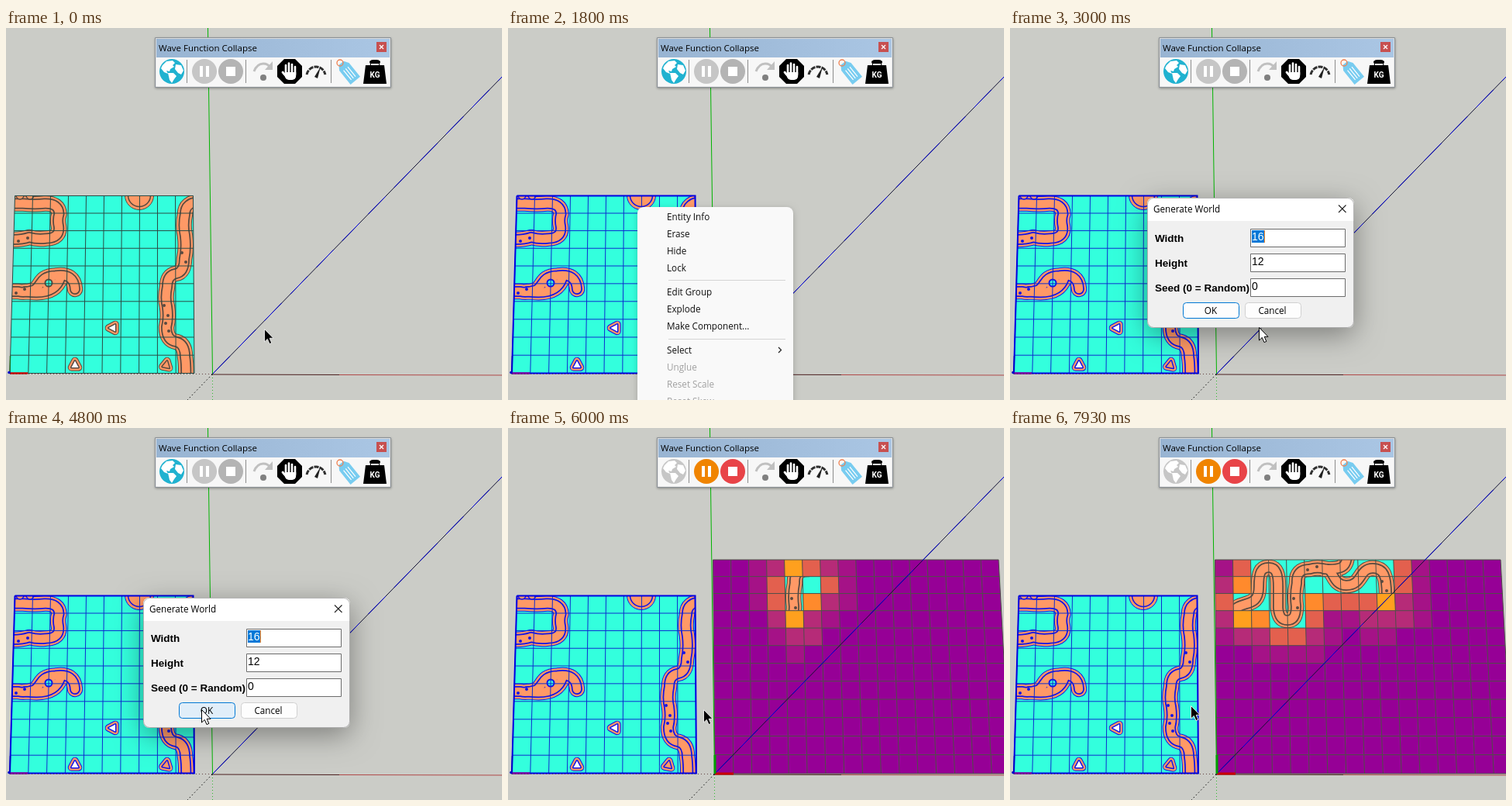
Animation, 640 px wide and 480 px high, one loop 8000 ms. Source, as an HTML page with a canvas:

```html
<!DOCTYPE html>
<html>
<head>
<meta charset="utf-8">
<style>
html, body { margin: 0; width: 640px; height: 480px; overflow: hidden; background: #cbccc7; }
canvas { display: block; }
</style>
</head>
<body>
<canvas id="stage" width="640" height="480"></canvas>
<script>
const ctx = document.getElementById('stage').getContext('2d');
const LOOP = 8000, SELECT = 1000, DIALOG = 2600, CLOSE = 5400, WORLD = 5530;
const CYAN = '#33ffdd', ORANGE = '#ff9966', DARK = '#594a40', BLUE = '#1414e6';
const HEAT = ['#960096', '#a51287', '#b62b78', '#e3604e', '#ff8a2c', '#ffa01e'];
const UI = '"Open Sans", "Noto Sans", sans-serif', ARIAL = '"Liberation Sans", Arial, sans-serif';

// Corners: top left, top right, bottom right, bottom left; k bends the row spacing.
const sample = { cols: 10, rows: 10, k: .02, q: [[11.5, 216.5], [241.5, 216.5], [243, 445.5], [5, 445.5]] };
const world = { cols: 16, rows: 12, k: .064, q: [[264.5, 170], [633, 170], [648, 446], [267, 446]] };

// Digits are heat levels, c is a finished tile.
const maps = [
  [],
  ['00125321', '0013cc31', '0013c421', '00025210', '0001220', '00001'],
  ['0013cccccc31', '0013cccccc31', '0123c4333521', '0125c2112221', '0122321011', '001111'],
  ['13cccccccc31', '24cccccccc31', '3cccc4333521', '254cc3112221', '1223321011', '001111']
];

const sampleRoads = [
  'M0 226.5H22Q38 228 50 226.5Q68 226 68.5 240Q66 247 68 256Q70 271 52 271.5Q40 273 30 270Q18 274 0 272.5',
  'M250 224Q231 225 231 240Q228 255 231 268Q233 284 230 298Q230 315 219 317Q208 319 208 334Q205 348 208 360Q210 374 207 386Q207 403 220 405Q231 408 231 424Q233 436 232 460',
  'M0 340H16Q24 342 32 339C47 337 40 320 64 319.5Q88 316 89 337',
  'M25 340Q62 346 70 323'
].map(d => new Path2D(d));
const worldRoads = [
  'M286 238C298 221 321 234 321 205C321 186 324 180 334 180C344 180 346 190 346 205V232C347 244 351 248 358 248C366 248 369 242 369 230Q367 215 370 200Q369 182 387 182Q396 179 408 182C418 182 416 203 434 203C455 203 450 181 468 181C482 181 486 190 486 216',
  'M405 182C428 183 434 180 435 165'
].map(d => new Path2D(d));
const sampleDots = [[28, 271], [16, 275], [24, 337], [13, 342], [227, 290], [232, 302], [204, 358], [209, 371], [206, 381], [210, 391]];
const worldDots = [[366, 220], [371, 232], [384, 183], [396, 179], [480, 198], [486, 210]];

const mouse = [[0, 333, 388], [70, 333, 388], [870, 167, 231], [1000, 167, 231], [1800, 230, 500], [2580, 300, 500],
  [3000, 321, 386], [3400, 332, 295], [3670, 332, 295], [4000, 316, 392], [4400, 252, 363], [6200, 252, 363],
  [7000, 242, 361], [7870, 233, 358], [LOOP, 233, 358]];

function at(g, u, v) {
  const [a, b, c, d] = g.q, x = u / g.cols, f = v / g.rows, y = f * (1 - g.k * (1 - f));
  return [0, 1].map(i => (a[i] * (1 - x) + b[i] * x) * (1 - y) + (d[i] * (1 - x) + c[i] * x) * y);
}

function line(points, color, width = 1, dash = []) {
  ctx.beginPath();
  points.forEach(p => ctx.lineTo(...p));
  ctx.strokeStyle = color;
  ctx.lineWidth = width;
  ctx.setLineDash(dash);
  ctx.stroke();
  ctx.setLineDash([]);
}

function poly(points, fill) {
  ctx.beginPath();
  points.forEach(p => ctx.lineTo(...p));
  ctx.closePath();
  ctx.fillStyle = fill;
  ctx.fill();
}

function disc(x, y, r, fill, stroke, width = 1) {
  ctx.beginPath();
  ctx.arc(x, y, r, 0, 7);
  if (fill) { ctx.fillStyle = fill; ctx.fill(); }
  if (stroke) { ctx.strokeStyle = stroke; ctx.lineWidth = width; ctx.stroke(); }
}

function rect(x, y, w, h, fill, stroke, r = 0) {
  ctx.beginPath();
  ctx.roundRect(x, y, w, h, r);
  if (fill) { ctx.fillStyle = fill; ctx.fill(); }
  if (stroke) { ctx.strokeStyle = stroke; ctx.lineWidth = 1; ctx.stroke(); }
}

function text(s, x, y, font, color = '#000', align = 'left') {
  ctx.font = font;
  ctx.fillStyle = color;
  ctx.textAlign = align;
  ctx.fillText(s, x, y);
}

function shadowed(blur, dy, alpha, draw) {
  ctx.save();
  ctx.shadowColor = `rgba(0,0,0,${alpha})`;
  ctx.shadowBlur = blur;
  ctx.shadowOffsetY = dy;
  draw();
  ctx.restore();
}

function roads(paths, ink, dots) {
  ctx.lineCap = ctx.lineJoin = 'round';
  for (const [width, color] of [[20.5, ink], [18.5, ORANGE], [14, ink], [10.5, ORANGE]]) {
    ctx.lineWidth = width;
    ctx.strokeStyle = color;
    paths.forEach(p => ctx.stroke(p));
  }
  ctx.lineCap = 'butt';
  dots.forEach(([x, y]) => disc(x, y, 2, ink));
}

function grid(g, color) {
  for (let u = 0; u <= g.cols; u++) line([at(g, u, 0), at(g, u, g.rows)], color);
  for (let v = 0; v <= g.rows; v++) line([at(g, 0, v), at(g, g.cols, v)], color);
}

function rock(x, y, turn, fill, ink) {
  const tri = new Path2D('M0 -4.5L4.5 4H-4.5Z');
  ctx.save();
  ctx.translate(x, y);
  ctx.rotate(turn);
  ctx.lineJoin = 'round';
  for (const [w, c] of [[9.5, ink], [7.5, ORANGE], [3, ink]]) {
    ctx.lineWidth = w;
    ctx.strokeStyle = c;
    ctx.stroke(tri);
  }
  ctx.fillStyle = fill;
  ctx.fill(tri);
  ctx.restore();
}

function drawSample(selected) {
  const ink = selected ? BLUE : DARK;
  poly(sample.q, CYAN);
  ctx.save();
  ctx.clip();
  roads(sampleRoads, ink, sampleDots);
  for (const x of [18, 31]) disc(x, 216, 5, ORANGE, ink, 1.5);
  disc(172, 216, 18.5, ORANGE, ink);
  disc(172, 216, 14.5, null, ink, 1.6);
  disc(55, 329, 9, ORANGE);
  disc(55, 329, 4.5, CYAN, ink, 2);
  rock(137, 387, -Math.PI / 2, '#fff', ink);
  rock(89, 434, 0, '#fff', ink);
  rock(207, 434, .2, ORANGE, ink);
  ctx.restore();
  grid(sample, selected ? '#0d2bd0' : '#2b4a44');
  if (selected) line([...sample.q, sample.q[0]], '#0000e0', 2);
  line([[5, 445], [5.5, 423]], selected ? '#0000c0' : '#207020', 1.5);
  line([[5, 445.5], [28, 445.5]], selected ? '#8000a0' : '#c80000', 2.5);
  disc(4, 444.5, 1.8, '#0000c8');
}

// Each stage spreads outward by column from where the collapse began.
function changeTime(stage, u, v) {
  const d = Math.abs(u - 4);
  if (stage == 1) return 5730 + 65 * Math.max(d, Math.abs(v - 1));
  if (stage == 2) return 6200 + 110 * d;
  return 7130 + 800 / 3 * Math.min(d, 3);
}

function cellState(u, v, t) {
  let state = '0';
  for (let s = 1; s < 4; s++) if (t >= changeTime(s, u, v)) state = (maps[s][v] || '')[u] || '0';
  return state;
}

function drawWorld(t) {
  const done = new Path2D();
  poly(world.q, HEAT[0]);
  for (let v = 0; v < 6; v++) for (let u = 0; u < 12; u++) {
    const state = cellState(u, v, t);
    if (state == '0') continue;
    const cell = [at(world, u, v), at(world, u + 1, v), at(world, u + 1, v + 1), at(world, u, v + 1)];
    poly(cell, state == 'c' ? CYAN : HEAT[state]);
    if (state == 'c') done.addPath(new Path2D('M' + cell.join('L') + 'Z'));
  }
  ctx.save();
  ctx.clip(done);
  roads(worldRoads, DARK, worldDots);
  ctx.restore();
  grid(world, '#505048');
}

function drawAxes(hasWorld) {
  line([[260.5, 0], [266.5, 446]], '#00b400');
  line([[266.5, 447], [266.5, 480]], '#30b830', 1, [1, 3]);
  line([[266, 447], [430, 447.5]], '#4c2020');
  line([[430, 447.5], [640, 448]], '#b04848');
  line([[5, 446.5], [266, 446.5]], '#604040', 1, [1, 3]);
  line([[266, 447], [234, 480]], '#000', 1, [1.5, 3]);
  line([[266.5, 446.5], [640.5, 62.5]], '#101030');
  line([[266.5, 446.5], [640.5, 62.5]], '#0000e0', 1, [32, 16]);
  if (hasWorld) {
    line([[267, 446], [291, 446]], '#c80000', 3);
    line([[267, 446], [267, 422]], '#00a000', 3);
  }
}

function drawToolbar(running) {
  const gray = '#c6c6c6', y = 56;
  shadowed(3, 1, .3, () => rect(192.5, 12.5, 304, 64, '#f2f2f2', '#8a9096'));
  const bar = ctx.createLinearGradient(194, 0, 495, 0);
  bar.addColorStop(0, '#98b4d2');
  bar.addColorStop(1, '#aac6e4');
  rect(194, 14, 301, 24, bar);
  rect(194, 38, 301, 37, '#f7f7f7');
  text('Wave Function Collapse', 197, 30, '500 11.5px ' + UI);
  rect(478, 18, 13, 13, '#c75050');
  line([[482, 22], [487, 27]], '#fff', 1.3);
  line([[487, 22], [482, 27]], '#fff', 1.3);
  for (const x of [233.5, 309.5, 419.5]) line([[x, 41], [x, 71]], '#8c8c8c');

  disc(214, y, 16, running ? gray : '#20b2d0');
  ctx.fillStyle = '#fff';
  ctx.fill(new Path2D('M202 48L207 43L215 42L218 45L215 48L217 50L212 53L211 56L207 55L209 59L204 57L200 52ZM209 58L216 58L220 62L217 66L214 71L211 67ZM219 47L226 48L229 55L226 60L222 58L218 53Z'));

  disc(256, y, 16, running ? '#f08400' : gray);
  rect(250, 49, 4, 14, '#fff');
  rect(258, 49, 4, 14, '#fff');
  disc(290, y, 16, running ? '#e84448' : '#b4b4b4');
  rect(284, 50, 12, 12, '#fff');

  ctx.strokeStyle = '#c0c0c0';
  ctx.lineWidth = 3;
  ctx.stroke(new Path2D('M320 56Q324 46 332 46Q338 46 341 51'));
  poly([[344, 43], [344, 54], [334, 54]], '#c0c0c0');
  disc(332, 64, 4, '#808080');

  poly([[359, 40], [373, 40], [382, 49], [382, 63], [373, 72], [359, 72], [350, 63], [350, 49]], '#000');
  ctx.lineCap = 'round';
  for (const [x, top] of [[361, 48], [365, 45.5], [369, 47], [373, 50]]) line([[x, top], [x, 60]], '#fff', 2.6);
  line([[357, 57], [362, 63]], '#fff', 2.8);
  ctx.lineCap = 'butt';
  rect(360, 57, 14.2, 10, '#fff', null, [0, 0, 5, 5]);

  ctx.beginPath();
  ctx.arc(400, 62, 12, Math.PI * 1.05, Math.PI * 1.95);
  ctx.strokeStyle = '#303030';
  ctx.lineWidth = 3;
  ctx.setLineDash([6, 1.2]);
  ctx.stroke();
  ctx.setLineDash([]);
  poly([[406, 50], [402, 65], [398, 63]], '#202020');

  ctx.save();
  ctx.translate(442, 57);
  ctx.rotate(-.68);
  poly([[-8, 14], [-8, -9], [-4, -15], [4, -15], [8, -9], [8, 14]], '#78ccf0');
  for (const x of [-3.5, 0, 3.5]) line([[x, -6], [x, 10]], '#fff', 1.2);
  ctx.restore();
  disc(431, 45, 4, null, '#f08050', 1.3);

  rect(470.5, 41.5, 11, 9, null, '#000', 2);
  rect(469, 42, 14, 4, '#000', null, 2);
  poly([[464, 48], [488, 48], [491, 72], [461, 72]], '#000');
  text('KG', 476, 64, 'bold 10px Roboto, sans-serif', '#fff', 'center');
}

function drawMenu() {
  shadowed(8, 2, .2, () => rect(167, 231, 201, 270, '#f9f9f9', null, 8));
  const items = { 'Entity Info': 248, Erase: 270, Hide: 292, Lock: 314, 'Edit Group': 345, Explode: 367,
    'Make Component...': 389, Select: 420, Unglue: 442, 'Reset Scale': 464, 'Reset Skew': 486 };
  for (const name in items) text(name, 205, items[name], '11.7px ' + UI, items[name] > 430 ? '#a0a0a0' : '#101010');
  for (const y of [325.5, 401.5]) line([[207, y], [358, y]], '#d4d4d4');
  line([[349, 412], [352.5, 415.5], [349, 419]], '#202020', 1.2);
}

function drawDialog(t, hover) {
  shadowed(36, 9, .38, () => rect(177, 219, 267, 168, '#f0f0f0', null, 8));
  rect(177, 219, 267, 30, '#fff', null, [8, 8, 0, 0]);
  rect(177.5, 219.5, 266, 167, null, 'rgba(90,90,90,.45)', 8);
  text('Generate World', 185, 238, '11.7px ' + UI);
  line([[424, 228.5], [433.5, 238]], '#202020', 1.1);
  line([[433.5, 228.5], [424, 238]], '#202020', 1.1);
  [['Width', '16'], ['Height', '12'], ['Seed (0 = Random)', '0']].forEach(([label, value], i) => {
    const y = 259.5 + 32 * i;
    text(label, 187, y + 16.5, 'bold 13.5px ' + ARIAL);
    rect(310.5, y, 122, 23, '#fff', '#6c6c6c');
    if (!i) rect(312, 261, 16, 16, '#0078d7');
    text(value, 312, y + 14.5, '14px ' + ARIAL, i ? '#000' : '#fff');
  });
  if ((t - 2680) % 1060 < 530) rect(328, 261, 1, 16, '#ff8728');
  rect(223.5, 354.5, 72, 20, hover ? '#e0eef9' : '#fdfdfd', '#0078d4', 4);
  rect(303.5, 354.5, 72, 20, '#fdfdfd', '#d0d0d0', 4);
  text('OK', 259, 369, '11.7px ' + UI, '#000', 'center');
  text('Cancel', 338.5, 369, '11.7px ' + UI, '#000', 'center');
}

function mouseAt(t) {
  const i = mouse.findIndex(m => m[0] > t), a = mouse[i - 1], b = mouse[i];
  const p = (t - a[0]) / (b[0] - a[0]), e = p * p * (3 - 2 * p);
  return [1, 2].map(k => Math.round(a[k] + (b[k] - a[k]) * e));
}

function drawCursor(x, y, white, beam) {
  ctx.save();
  ctx.translate(x, y);
  if (beam) {
    line([[.5, -9], [.5, 9]], '#000');
    for (const v of [-9.5, 9.5]) line([[-3, v], [4, v]], '#000');
  } else {
    const arrow = new Path2D('M.5 .5V17L4.3 13.4L7 19.6L9.8 18.4L7.2 12.3H12Z');
    ctx.lineWidth = 1;
    ctx.lineJoin = 'miter';
    ctx.strokeStyle = white ? '#000' : '#e8e8e8';
    ctx.fillStyle = white ? '#fff' : '#000';
    ctx.fill(arrow);
    ctx.stroke(arrow);
  }
  ctx.restore();
}

function draw(t) {
  const [x, y] = mouseAt(t), hasWorld = t >= WORLD, open = t >= DIALOG && t < CLOSE;
  ctx.fillStyle = '#cbccc7';
  ctx.fillRect(0, 0, 640, 480);
  drawSample(t >= SELECT);
  if (hasWorld) drawWorld(t);
  drawAxes(hasWorld);
  drawToolbar(hasWorld);
  if (t >= SELECT && t < DIALOG) drawMenu();
  if (open) drawDialog(t, x > 223 && x < 296 && y > 354 && y < 375);
  const beam = open && x > 310 && x < 433 && y > 259 && y < 347 && (y - 259) % 32 < 24;
  drawCursor(x, y, t >= SELECT && t < CLOSE, beam);
}

const start = performance.now();
function tick() {
  draw((performance.now() - start) % LOOP);
  requestAnimationFrame(tick);
}
tick();
</script>
</body>
</html>
```
